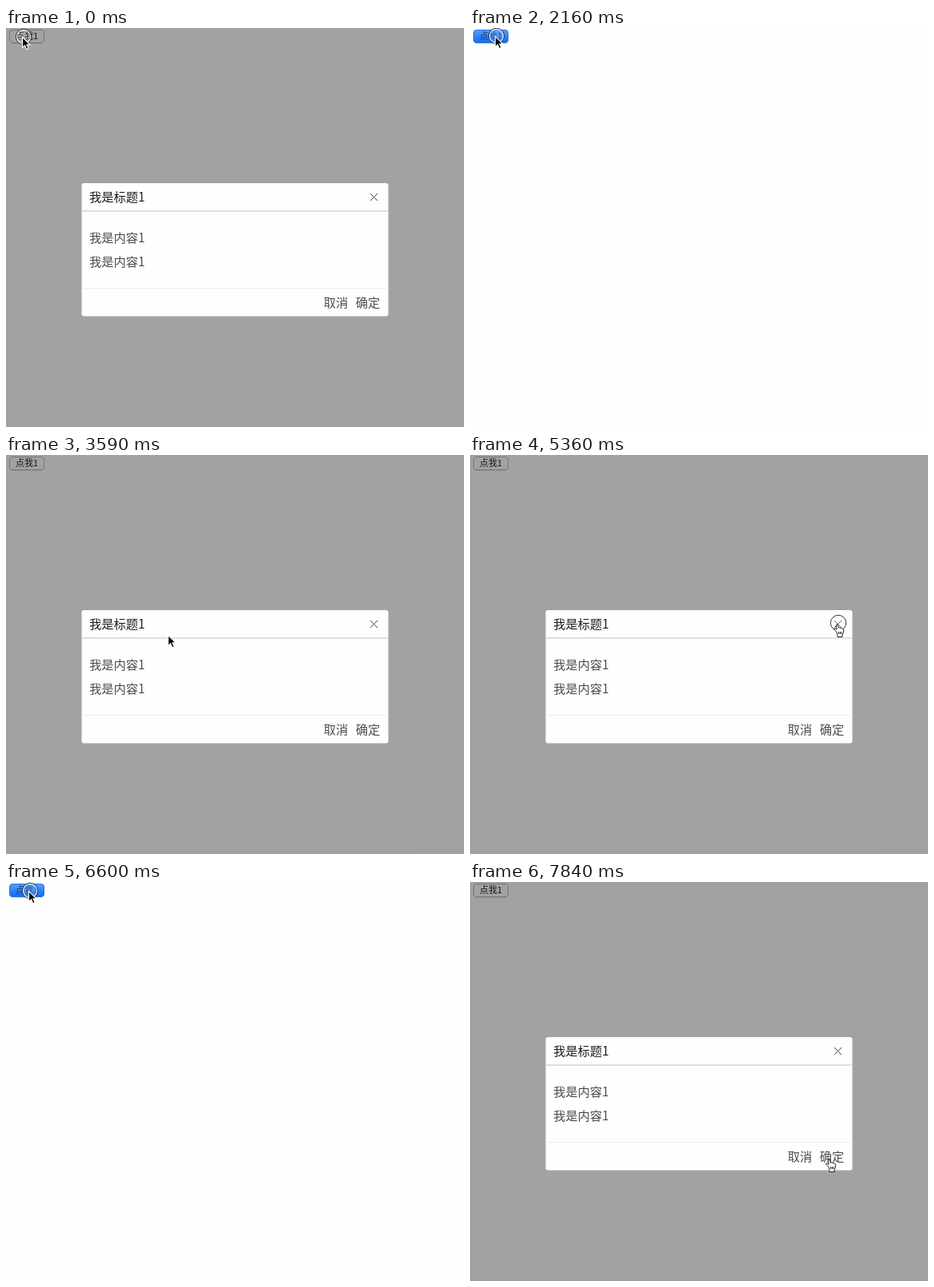
Animation of 572 by 499 pixels, one loop 8 s. Source, as an HTML page:

```html
<!DOCTYPE html>
<html lang="zh-CN">
<head>
<meta charset="utf-8">
<title>弹窗</title>
<style>
  html, body { margin: 0; width: 100%; height: 100%; overflow: hidden; background: #fefefe; }
  svg { display: block; width: 572px; height: 499px; }
  text { font: 300 15.28px "Noto Sans CJK SC", "Noto Sans CJK", sans-serif; fill: #4c4c4c; }
  .title { fill: #1c1c1c; }
  .label { font-size: 11px; font-weight: 400; fill: #222; }
  .face { fill: #fff; stroke: #b8b8b8; }
  .pressed .face { fill: url(#blue); stroke: #2a72e0; }
  .pressed .label { fill: #123a80; }
  .off { display: none; }
</style>
</head>
<body>
<svg viewBox="0 0 572 499">
  <defs>
    <linearGradient id="blue" x2="0" y2="1">
      <stop stop-color="#559ffa"/>
      <stop offset="1" stop-color="#1569f3"/>
    </linearGradient>
  </defs>

  <g id="button">
    <path d="M7 19H45" stroke="#ccc"/>
    <rect class="face" x="4.5" y="2.5" width="43" height="16" rx="3.5"/>
    <text class="label" x="12" y="14.3">点我1</text>
  </g>

  <g id="modal">
    <rect width="572" height="499" fill="#000" fill-opacity=".365"/>
    <rect x="94.5" y="194" width="383" height="166.5" rx="3" fill="#fefefe"/>
    <path d="M94.5 229H477.5" stroke="#d4d4d4" stroke-width="1.4"/>
    <path d="M94.5 325.5H477.5" stroke="#eee"/>
    <path d="M455 207l9 9m0-9l-9 9" stroke="#444"/>
    <text class="title" x="104" y="217">我是标题1</text>
    <text x="104" y="267.8">我是内容1</text>
    <text x="104" y="298.2">我是内容1</text>
    <text x="396.7" y="349">取消</text>
    <text x="436.7" y="349">确定</text>
  </g>

  <g id="pointer">
    <g id="ring" fill="none">
      <circle cx="2" cy="0" r="8.6" fill="#fff" fill-opacity=".12" stroke="#fff" stroke-width="1.2"/>
      <circle cx="2" cy="0" r="9.7" stroke="#333"/>
    </g>
    <path id="arrow" d="M.5 .5V13.6L3.5 10.8 5.6 15.8 8 14.8 5.9 9.9H10Z" stroke="#fff" stroke-width="1.1"/>
    <path id="hand" fill="#fff" stroke="#222" stroke-linejoin="round"
      d="M-.2 11.2L-3.2 8.2Q-3.8 6.6-1.8 6.9L0 8.3-.6 3Q-.3 1.2 1.3 2.2L2.3 6.2Q3.6 5.2 4.6 6.5 6 5.8 6.8 7.2 8.6 6.7 8.7 8.6L8.4 12.5 7 15V17.5H1V15.4Z
         M2.6 11V14M4.4 11V14M6.2 11V14"/>
  </g>
</svg>

<script>
  const LOOP = 8000, COUNT = 45;
  const el = id => document.getElementById(id);
  const show = (id, on) => el(id).classList.toggle('off', !on);

  // Pointer stops: tick, x, y
  const stops = [
    [0, 20, 11], [1, 62, 50], [2, 150, 135], [3, 232, 191], [4, 252, 158],
    [8, 252, 158], [12, 31, 10], [14, 31, 10], [20, 202, 225], [26, 376, 318],
    [29, 458, 210], [31, 458, 210], [36, 28, 11], [38, 28, 11], [44, 448, 345]
  ];
  const clicks = [0, 6, 12, 13, 30, 37];
  const presses = [12, 37];
  const hovers = [29, 30, 44];

  // Ticks last 180 ms; later ones now and then lose 10 ms
  const startOf = i => 180 * i - 10 * Math.max(0, Math.floor((i - 15.1) / 3.6));

  function tickAt(t) {
    let i = COUNT - 1;
    while (i > 0 && startOf(i) > t) i--;
    return i;
  }

  function pointerAt(i) {
    const n = Math.max(1, stops.findIndex(s => s[0] >= i));
    const [t0, x0, y0] = stops[n - 1], [t1, x1, y1] = stops[n];
    const u = (i - t0) / (t1 - t0), k = u * u * (3 - 2 * u);
    return [x0 + (x1 - x0) * k, y0 + (y1 - y0) * k].map(Math.round);
  }

  function draw(i) {
    const hand = hovers.includes(i);
    el('pointer').setAttribute('transform', `translate(${pointerAt(i)})`);
    el('button').classList.toggle('pressed', presses.includes(i));
    show('modal', i < 7 || (i > 12 && i < 31) || i > 37);
    show('ring', clicks.includes(i));
    show('hand', hand);
    show('arrow', !hand);
  }

  const begin = performance.now();
  function loop() {
    draw(tickAt((performance.now() - begin) % LOOP));
    requestAnimationFrame(loop);
  }
  loop();
</script>
</body>
</html>
```
